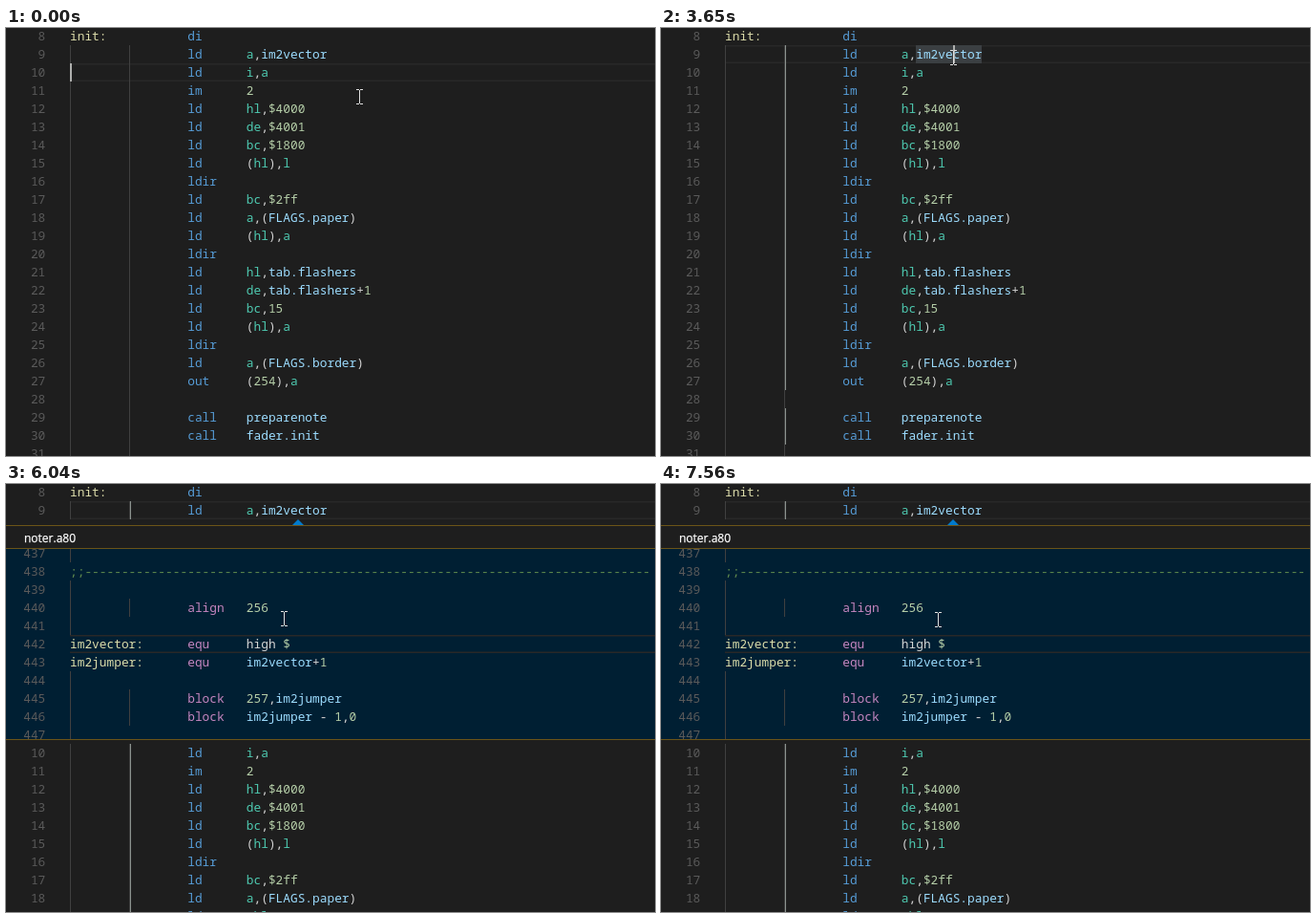
An HTML page that plays this animation: 680x448 px, repeating every 8000 ms.

```html
<!DOCTYPE html>
<html lang="en">
<head>
<meta charset="utf-8">
<title>Peek definition</title>
<style>
html, body { margin: 0; width: 100%; height: 100%; overflow: hidden; background: #1e1e1e; }
svg { display: block; }
text { font: 12.83px "Noto Sans Mono", "DejaVu Sans Mono", monospace; white-space: pre; fill: #d4d4d4; }
.num { fill: #5a5a5a; text-anchor: end; }
.op { fill: #569cd6; }
.dir { fill: #c586c0; }
.label { fill: #dcdcaa; }
.reg { fill: #4ec9b0; }
.lit { fill: #b5cea8; }
.id { fill: #9cdcfe; }
.note { fill: #608b4e; }
.guide { fill: #404040; }
.active { fill: #8b928e; }
.line { fill: #282828; }
.caret { fill: #aeafad; }
.edge { fill: #6b5418; }
.title { font: 12px "Open Sans", "Noto Sans", sans-serif; fill: #fff; stroke: #fff; stroke-width: .25; }
</style>
</head>
<body>
<svg id="stage" width="680" height="448" viewBox="0 0 680 448"></svg>
<script>
const LOOP = 8000, ROW = 19, CHAR = 7.7, LEFT = 67;
const stage = document.getElementById('stage');

function add(parent, tag, attrs = {}, text) {
  const node = document.createElementNS('http://www.w3.org/2000/svg', tag);
  for (const key in attrs) node.setAttribute(key, attrs[key]);
  if (text !== undefined) node.textContent = text;
  parent.appendChild(node);
  return node;
}
const box = (parent, cls, x, y, width, height) =>
  add(parent, 'rect', { class: cls, x, y, width, height });
const show = (node, on) => node.setAttribute('display', on ? 'inline' : 'none');

function kind(token) {
  if (token[0] === ';') return 'note';
  if (/:$/.test(token)) return 'label';
  if (/^(align|equ|block)$/.test(token)) return 'dir';
  if (/^(di|ld|im|ldir|out|call|push)$/.test(token)) return 'op';
  if (/^(a|i|l|hl|de|bc|af)$/.test(token)) return 'reg';
  if (/^[$\d]/.test(token)) return 'lit';
  return /^[a-z]/i.test(token) && token !== 'high' ? 'id' : '';
}

function drawCode(parent, y, code) {
  for (const match of code.matchAll(/;.*|[a-z][\w.]*:?|\$?\d\w*|\$\w*|[^\s\w$;]+/gi))
    add(parent, 'text', { class: kind(match[0]), x: LEFT + match.index * CHAR, y }, match[0]);
}

// Each source row is "label|opcode|operand|comment".
function drawRow(parent, number, top, source) {
  const [label, op = '', operand = '', comment = ''] = source.split('|');
  add(parent, 'text', { class: 'num', x: 41.3, y: top + 14 }, number);
  if (!label) box(parent, 'guide', LEFT, top, 1, ROW);
  drawCode(parent, top + 14,
    label.padEnd(16) + op.padEnd(8) + operand.padEnd(16) + comment);
  return { indented: !label && op };
}

function currentLine(parent, top) {
  const g = add(parent, 'g');
  box(g, 'line', LEFT, top, 613, 1.5);
  box(g, 'line', LEFT, top + ROW - 1.5, 613, 1.5);
  return g;
}

const program = `init:|di
|ld|a,im2vector
|ld|i,a
|im|2
|ld|hl,$4000
|ld|de,$4001
|ld|bc,$1800
|ld|(hl),l
|ldir
|ld|bc,$2ff
|ld|a,(FLAGS.paper)
|ld|(hl),a
|ldir
|ld|hl,tab.flashers
|ld|de,tab.flashers+1
|ld|bc,15
|ld|(hl),a
|ldir
|ld|a,(FLAGS.border)
|out|(254),a
|
|call|preparenote
|call|fader.init
|`.split('\n');

const definition = `|
;;${'-'.repeat(77)}
|
|align|256
|
im2vector:|equ|high $
im2jumper:|equ|im2vector+1
|
|block|257,im2jumper
|block|im2jumper - 1,0
|
baseint:|push|af|; interrupt handler
|ld|a,(FLAGS.border)
|out|(254),a`.split('\n');

// Main editor: the rows after line 9 are pushed down when the peek opens.
const line10 = currentLine(stage, 37);
const line9 = currentLine(stage, 18);
const wordMark = add(stage, 'rect', { x: 267, y: 18, width: 69, height: ROW, fill: '#3b3f42' });
const head = add(stage, 'g'), tail = add(stage, 'g');
const activeGuides = [];
program.forEach((source, i) => {
  const number = i + 8, top = i * ROW - 1;
  const parent = number < 10 ? head : tail;
  const { indented } = drawRow(parent, number, top, source);
  if (i) box(parent, 'guide', 129, top, 1, ROW);
  if (indented) activeGuides.push(box(parent, 'active', 130, top, 1, ROW));
});
const caret10 = box(stage, 'caret', 67, 37, 2, ROW);
const caret9 = box(stage, 'caret', 306, 18, 2, ROW);

// Inline definition panel.
const peek = add(stage, 'g');
add(peek, 'rect', { y: 43, width: 680, height: 229, fill: '#1e1e1e' });
add(peek, 'path', { d: 'M300 43l6-6 6 6z', fill: '#007acc' });
add(peek, 'text', { class: 'title', x: 19, y: 61 }, 'noter.a80');
const pane = add(peek, 'svg', { y: 68, width: 680, height: 199, viewBox: '0 68 680 199' });
add(pane, 'rect', { y: 68, width: 680, height: 199, fill: '#001f33' });
const scroller = add(pane, 'g');
currentLine(scroller, 158);
definition.forEach((source, i) => {
  const top = 63 + i * ROW;
  if (drawRow(scroller, 437 + i, top, source).indented) box(scroller, 'guide', 129, top, 1, ROW);
});
for (const y of [43, 67, 267]) box(peek, 'edge', 0, y, 680, 1);

const beam = add(stage, 'path', {
  d: 'M0 .5h3m1 0h3M3.5 1v14M0 15.5h3m1 0h3', fill: 'none', stroke: '#e0e0e0'
});
const arrow = add(stage, 'path', {
  d: 'M.5 .5v16l4-3.5 2.5 5.5 2-1-2.500-5h5z', fill: '#fff', stroke: '#000'
});

const pointer = [
  [0, 367, 64], [640, 357, 57], [1060, 341, 48], [1280, 311, 27], [1490, 303, 23],
  [4950, 312, 71], [5170, 297, 112], [5380, 288, 132], [6040, 288, 133], [6250, 287, 134]
];
const scroll = [[0, 0], [6250, 35], [6470, 50], [7560, 0]];
const blinks = [210, 640, 850, 1060, 1280, 1700, 2570, 2780, 3220, 3650];
const latest = (steps, t) => steps.filter(step => step[0] <= t).pop();

function render(t) {
  const clicked = t >= 1920, open = t >= 3860;
  const lit = blinks.filter(time => time <= t).length % 2 === 0;
  show(line10, !clicked);
  show(line9, clicked);
  show(caret10, !clicked && lit);
  show(caret9, clicked && !open && (lit || t < 2570));
  show(wordMark, t >= 2350 && !open);
  activeGuides.forEach(guide => show(guide, clicked));
  show(peek, open);
  tail.setAttribute('transform', `translate(0 ${open ? 235 : 0})`);
  scroller.setAttribute('transform', `translate(0 ${-latest(scroll, t)[1]})`);

  const [, x, y] = latest(pointer, t);
  const overTitle = t >= 4950 && t < 5170;
  show(arrow, overTitle);
  show(beam, !overTitle);
  (overTitle ? arrow : beam).setAttribute('transform', `translate(${x} ${y})`);
}

const start = performance.now();
function tick() {
  render((performance.now() - start) % LOOP);
  requestAnimationFrame(tick);
}
render(0);
requestAnimationFrame(tick);
</script>
</body>
</html>
```
